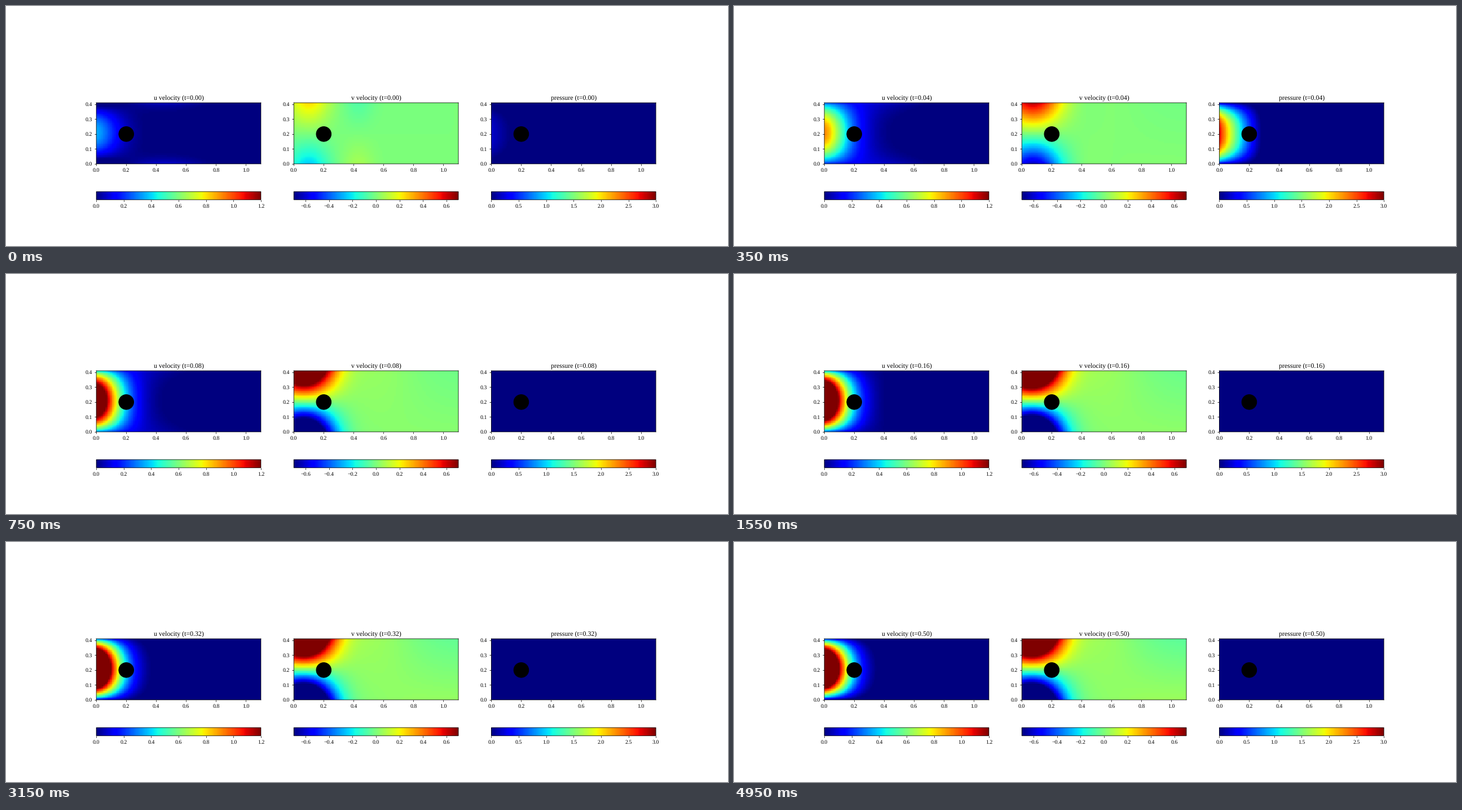
Animation, 1280 px wide and 427 px high, one loop 5 s. Source, as a matplotlib script:

```python
import numpy as np
import matplotlib.pyplot as plt
from matplotlib.animation import FuncAnimation

plt.rcParams.update({
    "font.family": "Liberation Serif",
    "text.hinting": "none",
    "path.snap": False,
})

FRAMES = 100
WIDTH, HEIGHT = 1.1, 0.41
X, Y = np.meshgrid((np.arange(110) + 0.5) / 100, (np.arange(41) + 0.5) / 100)


def bump(x, x0, w):
    return np.exp(-((x - x0) / w) ** 2)


def fade(i, span):
    return np.exp(-i / span)


def pulse(i, span):
    """Rises to 1 at i = span, then dies away."""
    return i / span * np.exp(1 - i / span)


def onset(i):
    """Smooth start-up from 0 to 1."""
    return 1 - bump(i, 0, 12)


def u_field(i):
    late = i / (FRAMES - 1)
    d = np.abs(Y - .21)
    amp = .37 + onset(i) + .65 * (1 - fade(i, 30))
    half = .232 - .017 * late - .05 * fade(i, 4)
    inflow = amp * (1 - (d / half) ** 2) * np.exp(-(X / .16) ** 1.6)
    tail = .15 * pulse(i, 10) * bump(X, 0, .3 + .15 * (d / .2) ** 2)
    edge = .08 * fade(i, 6) * (d / .2) ** 4 * bump(X, .45, .27)
    return inflow + tail + edge - .015 - .045 * late


def v_field(i):
    late = i / (FRAMES - 1)
    s = (Y - .202) / .2
    amp = .24 + 1.31 * onset(i)
    main = amp * s * bump(X, .065 + .035 * fade(i, 5), .19 - .05 * fade(i, 3))
    echo = -.07 * fade(i, 5) * s * bump(X, .43, .11)
    lift = .04 * onset(i) * (1 + .5 * s) * bump(X, .55, .3)
    tilt = -.055 * np.sqrt(late) * s / (1 + np.exp((.7 - X) / .1))
    return main + echo + lift + tilt


def p_field(i):
    side = np.maximum(1 - (np.abs(Y - .203) / .22) ** 2.5, 0)
    cone = side * np.maximum(1 - X / .34, 0) ** 1.5
    return np.maximum(3 * bump(i, 6.5, 4.6) * cone - .2, 0)


PANELS = [
    ("u velocity", u_field, 0, 1.2, np.arange(7) * .2),
    ("v velocity", v_field, -.7, .7, np.arange(-3, 4) * .2),
    ("pressure", p_field, 0, 3, np.arange(7) * .5),
]

# 18 inches across 1280 px
fig, axes = plt.subplots(1, 3, figsize=(18, 427 * 18 / 1280), dpi=71.11112)
fig.subplots_adjust(left=.1251, right=.9001, bottom=.1112, top=.8812)
images = []
for ax, (name, field, lo, hi, ticks) in zip(axes, PANELS):
    im = ax.imshow(field(0), origin="lower", extent=(0, WIDTH, 0, HEIGHT),
                   cmap="jet", vmin=lo, vmax=hi, interpolation="nearest")
    ax.add_patch(plt.Circle((.2, .2), .05, color="black", zorder=2.2))
    ax.set_xticks(np.arange(6) * .2)
    ax.set_yticks(np.arange(5) * .1)
    ax.xaxis.set_major_formatter("{x:.1f}")
    ax.yaxis.set_major_formatter("{x:.1f}")
    bar = fig.colorbar(im, ax=ax, orientation="horizontal")
    bar.set_ticks(ticks)
    bar.set_ticklabels([f"{t:.1f}".replace("-", "\u2212") for t in ticks])
    images.append(im)


def update(i):
    t = i * .5 / (FRAMES - 1)
    for ax, im, (name, field, *_) in zip(axes, images, PANELS):
        im.set_data(field(i))
        ax.set_title(f"{name} (t={t:.2f})")
    return images


anim = FuncAnimation(fig, update, frames=FRAMES, interval=50, repeat=True,
                     repeat_delay=0, init_func=lambda: update(0))
plt.show()
```
